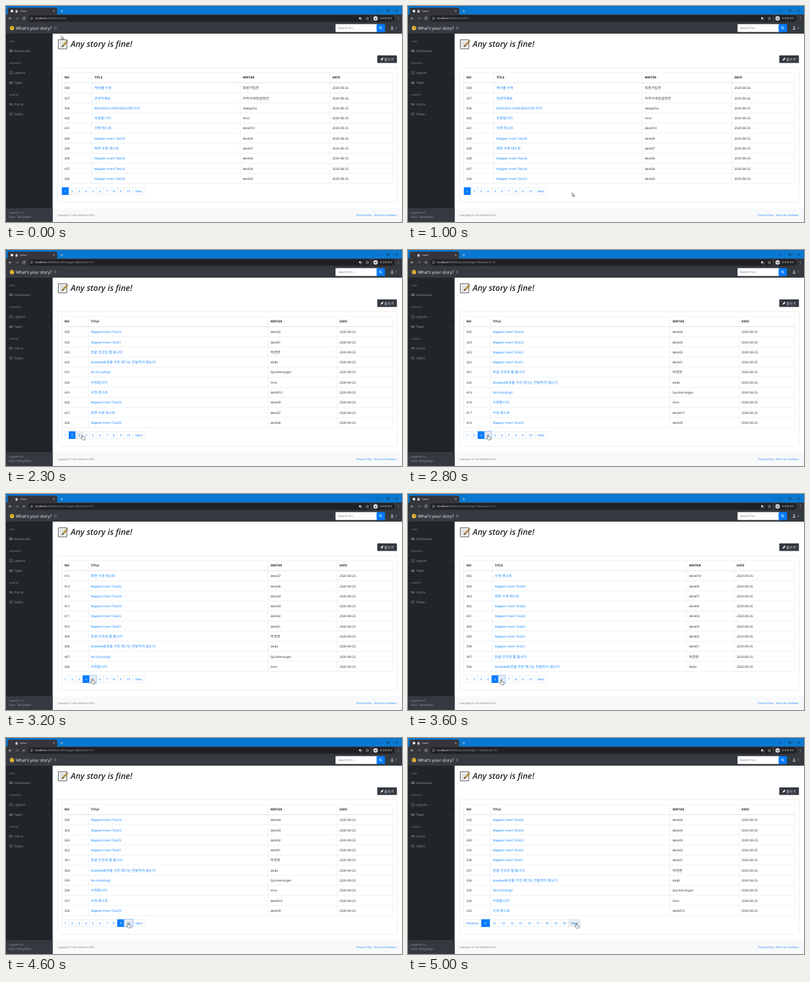
Animation, 600 px wide and 328 px high, one loop 5100 ms. Source, as an HTML page:

```html
<!DOCTYPE html>
<html lang="ko">
<head>
<meta charset="utf-8">
<title>Home</title>
<style>
  html, body { margin: 0; width: 100%; height: 100%; overflow: hidden; background: #fff; }
  svg { display: block; width: 100vw; height: 100vh; text-rendering: geometricPrecision;
        font-family: 'Open Sans', 'Noto Sans CJK KR', 'Noto Sans', sans-serif; }
  .ko { font-family: 'Noto Sans CJK KR', sans-serif; font-weight: 300; font-size: 1.08em; letter-spacing: .06em; }
</style>
</head>
<body>
<svg viewBox="0 0 600 328"><g id="chrome"></g><g id="live"></g></svg>
<script>
const INK = '#212529', BLUE = '#007bff', DARK = '#343a40', LINE = '#dee2e6', MUTED = '#96989b';
const SIDE = 70.6, NAV_END = 42;

const rect = (x, y, w, h, fill, more = '') =>
  `<rect x="${x}" y="${y}" width="${w}" height="${h}" fill="${fill}" ${more}/>`;
const circle = (x, y, r, fill, more = '') => `<circle cx="${x}" cy="${y}" r="${r}" fill="${fill}" ${more}/>`;
const stroke = (d, color, width = .6, more = '') =>
  `<path d="${d}" fill="none" stroke="${color}" stroke-width="${width}" ${more}/>`;
const fill = (d, color, more = '') => `<path d="${d}" fill="${color}" ${more}/>`;
const hangul = s => s.replace(/[가-힣]+/g, '<tspan class="ko">$&</tspan>');
const text = (x, y, s, color = INK, size = 4.72, more = '') =>
  `<text x="${x}" y="${y}" fill="${color}" font-size="${size}" ${more}>${hangul(s)}</text>`;

// ---- Fixed parts ----
function browser() {
  return rect(0, 0, 600, 13.5, '#0a78d0') +
    fill('M1 14q1.500 0 1.500-2V4.700q0-2.200 2.200-2.200H75.300q2.200 0 2.200 2.200V12q0 2 1.500 2z', '#35363a') +
    fill('M13.800 8l2.200-2.400 2.200 2.400h-.7v2.300h-3V8z', '#c8cacc') +
    text(21, 9.2, 'Home', '#e8eaed', 3.6) +
    stroke('M71.200 6.500l2.400 2.400m0-2.400l-2.400 2.400M82.500 7.700h4m-2-2v4', '#e8eaed', .5) +
    stroke('M562.500 7h3.400M577 5.300h3v3h-3zM590.500 5.300l3.200 3.200m0-3.200l-3.200 3.200', '#06243d', .5) +
    rect(0, 13, 600, 12, '#35363a') +
    rect(33.5, 14, 519, 9.8, '#202124', 'rx="4.900"') +
    stroke('M8.500 18.900h-4.300m2-2l-2 2 2 2', '#dfe1e5', .65) +
    stroke('M14.500 18.900h4.300m-2-2l2 2-2 2', '#85888c', .65) +
    circle(38.6, 18.9, 1.8, 'none', 'stroke="#bdc1c6" stroke-width=".5"') +
    stroke('M38.600 18.500v1.400m0-2.300v.5', '#bdc1c6', .5) +
    rect(535, 17, 2.6, 3.2, '#bdc1c6') + rect(537, 18.2, 2.6, 3, 'none', 'stroke="#bdc1c6" stroke-width=".4"') +
    stroke('M547.500 16.600l.7 1.600 1.700.1-1.300 1.100.4 1.700-1.500-.9-1.500.9.4-1.700-1.300-1.100 1.700-.1z', '#dfe1e5', .45) +
    rect(555, 14, 34, 9.8, '#202124', 'rx="4.900"') + circle(560, 18.9, 3.3, '#e8eaed') +
    stroke('M558 18.600h4M558.700 20.100h2.600', '#35363a', .8) +
    text(566, 20.2, '시크릿 모드', '#e8eaed', 3.5) +
    [17, 18.9, 20.8].map(y => circle(594.5, y, .45, '#e8eaed')).join('');
}

function navbar() {
  return rect(0, 24.8, 600, NAV_END - 24.8, DARK) +
    circle(9.2, 33.5, 3.2, '#fbc936') +
    circle(8, 32.5, .5, '#3a2a16') + circle(10.6, 32.5, 1, 'none', 'stroke="#4b3a22" stroke-width=".5"') +
    stroke('M8.200 35.100q1.300-.6 2.200 0', '#4b3a22', .5) + fill('M6.300 34.900l1.600-.4.7 1.500-1.100 1.100z', '#e59a23') +
    text(15, 35.8, "What's your story?", '#fff', 6.35) +
    stroke('M73 31.900h3.600m-3.600 1.600h3.600m-3.600 1.600h3.600', '#9a9da0', .55) +
    rect(499.3, 27.6, 64, 11.8, '#fff', 'rx="1.200"') +
    text(503, 35.1, 'Search for...', '#6c757d') +
    rect(561.5, 27.6, 12.7, 11.8, BLUE, 'rx="1.200"') +
    circle(567.2, 32.9, 1.5, 'none', 'stroke="#fff" stroke-width=".7"') + stroke('M568.300 34.100l1.700 1.700', '#fff', .8) +
    circle(585, 32, 1.3, '#a4a7aa') + fill('M582.700 36.100q0-2.300 2.300-2.300t2.300 2.300z', '#a4a7aa') +
    fill('M589.600 32.800h2.800l-1.400 1.500z', '#a4a7aa');
}

function sidebar() {
  const heading = (y, s) => text(5, y, s, '#696c70', 3.25, 'font-weight="700"');
  const item = (y, s) => text(12, y, s, MUTED);
  const chevron = y => stroke(`M63.300 ${y}l1.500 1.500-1.500 1.500`, '#696c70', .6);
  const icon = '#63676b';
  return rect(0, NAV_END, SIDE, 328 - NAV_END, INK) + rect(0, 307, SIDE, 21, DARK) +
    heading(55.3, 'CORE') + heading(88.3, 'INTERFACE') + heading(136.3, 'ADDONS') +
    item(69.7, 'Dashboard') + item(102.8, 'Layouts') + item(117.9, 'Pages') +
    item(150.9, 'Charts') + item(166.1, 'Tables') +
    chevron(99.6) + chevron(114.8) +
    fill('M4.900 70v-1.600a2.600 2.600 0 0 1 5.200 0V70z', icon) + stroke('M7.500 69l1-2', INK, .5) +
    stroke('M5.200 99.300h4.400v4H5.200zm2.200 0v4', icon, .7) +
    fill('M4.800 114.500l2.500.6 2.500-.6v3.700l-2.500.5-2.500-.5z', icon) + stroke('M7.300 115v4', INK, .4) +
    stroke('M5 147v3.800h5', icon, .6) + fill('M5.800 150v-1.600l1.300-1.200 1 1 1.500-.8v2.600z', icon) +
    stroke('M5.200 162.400h4.400v3.700H5.200zm0 1.800h4.400m-2.200-1.800v3.700', icon, .6) +
    text(4, 315, 'Logged in as:', MUTED, 3.83) + text(4, 322.3, 'Plain Templates', MUTED);
}

function content() {
  return rect(SIDE, NAV_END, 600 - SIDE, 266, '#fff') +
    fill('M79.300 51.200h12.800v13.800H79.300z', '#f7f7f5', 'stroke="#2d2d2d" stroke-width=".8"') +
    stroke('M81.500 54.500h6m-6 2.300h5m-5 2.300h3m-3 2.300h7', '#8b9095', .5) +
    stroke('M93.200 53l-7 7.400', '#33291a', 2.4) + stroke('M92.700 53.500l-6.200 6.600', '#f4b932', 1.5) +
    fill('M85.200 59.800l-.9 2.800 2.700-1.100z', '#3a332a') +
    text(98, 62.4, 'Any story is fine!', INK, 12.5, 'font-weight="600" font-style="italic"') +
    rect(562.5, 74.9, 29.8, 11.7, DARK, 'rx="1.200"') +
    fill('M567.700 82.700l.4-1.600 2.500-2.500 1.300 1.300-2.500 2.500z', '#fff') +
    text(573, 82.5, '글쓰기', '#fff') +
    rect(78.2, 93.6, 514.3, 204.5, '#fff', 'rx="1.300" stroke="#dfdfdf" stroke-width=".5"') +
    rect(SIDE, 307.2, 600 - SIDE, 20.8, '#f8f9fa') +
    text(78, 319.2, 'Copyright © Your Website 2020', '#6c757d', 3.83) +
    `<text x="592.3" y="319.2" font-size="3.83" fill="${BLUE}" text-anchor="end">Privacy Policy
      <tspan fill="#6c757d">·</tspan> Terms &amp; Conditions</text>`;
}

// ---- Board data ----
const insert = n => ['Mapper Insert Test2' + n, 'desk0' + n];
const cycle = [
  ['수정합니다.', 'mno'], ['수정 테스트', 'desk010'], insert(9), ['화면 수정 테스트', 'desk07'],
  insert(6), insert(4), insert(3), insert(2), insert(1), ['한글 인코딩 잘 됩니다', '박견본'],
  ['disabled속성을 가진 태그는 전달하지 않는다.', 'dodo'], ['No Encoding!!', 'QuickArranger']
];
const newest = [
  [508, '게시물 수정', '회원가입전', 26], [507, '안녕하세요', '아직닉네임설정전', 26],
  [506, 'BUSINESS LAYER REGISTER TEST', 'sleepyFox', 25]
];
const run = (from, count) =>
  Array.from({ length: count }, (_, i) => [from - i, ...cycle[(442 - from + i) % 12], 25]);
const rowsOf = page => page === 1 ? [...newest, ...run(442, 7)] : run(page > 10 ? 342 : 455 - 10 * page, 10);

// Column edges follow the longest title and writer on the page.
const edges = { 1: [130, 354.8, 490.5], 5: [127.6, 422, 494.2], 6: [139.7, 326.3, 470.5] };

function table(page) {
  const cols = [84.6, ...(edges[page] || [124.6, 396.8, 501.4])];
  const top = 101, head = 116.5, step = 15.3, bottom = head + 10 * step;
  let lines = '', out = '';
  for (const x of [...cols, 586]) lines += `M${x} ${top}V${bottom}`;
  for (let i = 0; i <= 10; i++) lines += `M84.600 ${head + i * step}H586`;
  out += stroke(lines + `M84.600 ${top}H586`, LINE, .5) + stroke(`M84.600 ${head}H586`, LINE, .7);
  ['NO', 'TITLE', 'WRITER', 'DATE'].forEach((s, i) =>
    out += text(cols[i] + 3.9, 110.3, s, INK, 4.7, 'font-weight="700"'));
  rowsOf(page).forEach(([no, title, writer, day], i) => {
    const y = 126.2 + i * step;
    [String(no), title, writer, '2020-08-' + day].forEach((s, c) =>
      out += text(cols[c] + 3.9, y, s, c === 1 ? BLUE : INK));
  });
  return out;
}

function pager(page, tip, pressed) {
  const later = page > 10, first = later ? 11 : 1;
  const items = Array.from({ length: 10 }, (_, i) => [String(first + i), first + i > 9 ? 13.25 : 10.5]);
  if (later) items.unshift(['Previous', 26.4]);
  items.push(['Next', 17.8]);
  let x = 84.6, out = '', ring = '', over = false;
  for (const [label, w] of items) {
    const active = label === String(page);
    const hit = tip.y > 275 && tip.y < 287.2 && tip.x >= x && tip.x < x + w;
    over = over || hit;
    out += rect(x, 275.3, w, 11.6, active ? BLUE : hit ? '#e9ecef' : '#fff',
      active ? '' : `stroke="${LINE}" stroke-width=".45"`);
    out += text(x + w / 2, 282.9, label, active ? '#fff' : BLUE, 4.72, 'text-anchor="middle"');
    if (hit && pressed && !active)
      ring = rect(x, 275.3, w, 11.6, 'none', 'stroke="#9fcbfb" stroke-width="1.100"');
    x += w;
  }
  return { markup: out + ring, over };
}

// ---- Timeline ----
const opens = [0, 2000, 2600, 2900, 3300, 3800, 4000, 4400, 4600, 4700, 4900];
const path = [
  [0, 84, 45], [700, 130, 168], [800, 130, 168], [1000, 248.8, 283.5], [1200, 200, 314], [1400, 122, 292],
  [1700, 100, 281], [2000, 100, 281], [2300, 115.6, 281], [2600, 113, 281], [2800, 121, 281],
  [3000, 122, 281], [3100, 130.6, 281], [3300, 130.6, 281], [3500, 141.3, 282.5], [3700, 141.3, 282.5],
  [3900, 152, 281], [4000, 152.5, 281], [4100, 168.4, 281], [4300, 165, 281], [4500, 174, 281],
  [4600, 185, 281], [4700, 186, 281], [4800, 201, 281], [4900, 201, 281], [5000, 255, 281.5]
];

function pointerAt(t) {
  const i = Math.max(1, path.findIndex(p => p[0] >= t));
  const [t0, x0, y0] = path[i - 1], [t1, x1, y1] = path[i];
  const k = (t - t0) / (t1 - t0);
  return { x: x0 + (x1 - x0) * k, y: y0 + (y1 - y0) * k };
}

const ARROW = 'M0 0v5.500l1.300-1.100.9 1.900.8-.4-.9-1.800h1.800z';
const HAND = 'M-.7.400q.7-.8 1.400 0v2.300l2.800.6q1 .3.900 1.200l-.6 2.800H.3l-2.100-2.700q.1-1.100 1.100-.4z';

function toolbar(page, loading) {
  const query = page > 1 ? `?page=${page}&amp;amount=10` : '';
  return text(44, 20.4, `localhost<tspan fill="#9aa0a6">:8080/board/list${query}</tspan>`, '#fff', 4.1) +
    (loading
      ? stroke('M25.500 17.300l3.200 3.200m0-3.200l-3.200 3.200', '#dfe1e5', .65)
      : circle(9, 7.8, 2, '#f1f3f4') +
        stroke('M28.700 17.600a2 2 0 1 0 .4 1.800M29.100 16.500v1.700h-1.700', '#dfe1e5', .6));
}

function draw(t) {
  const page = opens.filter(at => at <= t).length;
  const wait = (opens[page] || Infinity) - t;
  const tip = pointerAt(t);
  const nav = pager(page, tip, wait <= 200);
  return toolbar(page, wait <= 100) + table(page) + nav.markup +
    fill(nav.over ? HAND : ARROW, '#fff',
      `transform="translate(${tip.x} ${tip.y})" stroke="#222" stroke-width=".55" stroke-linejoin="round"`);
}

document.getElementById('chrome').innerHTML = browser() + navbar() + content() + sidebar();
const live = document.getElementById('live');
let shown = -1;
function tick() {
  const t = Math.floor(performance.now() % 5100 / 100) * 100;
  if (t !== shown) live.innerHTML = draw(shown = t);
  requestAnimationFrame(tick);
}
tick();
</script>
</body>
</html>
```
